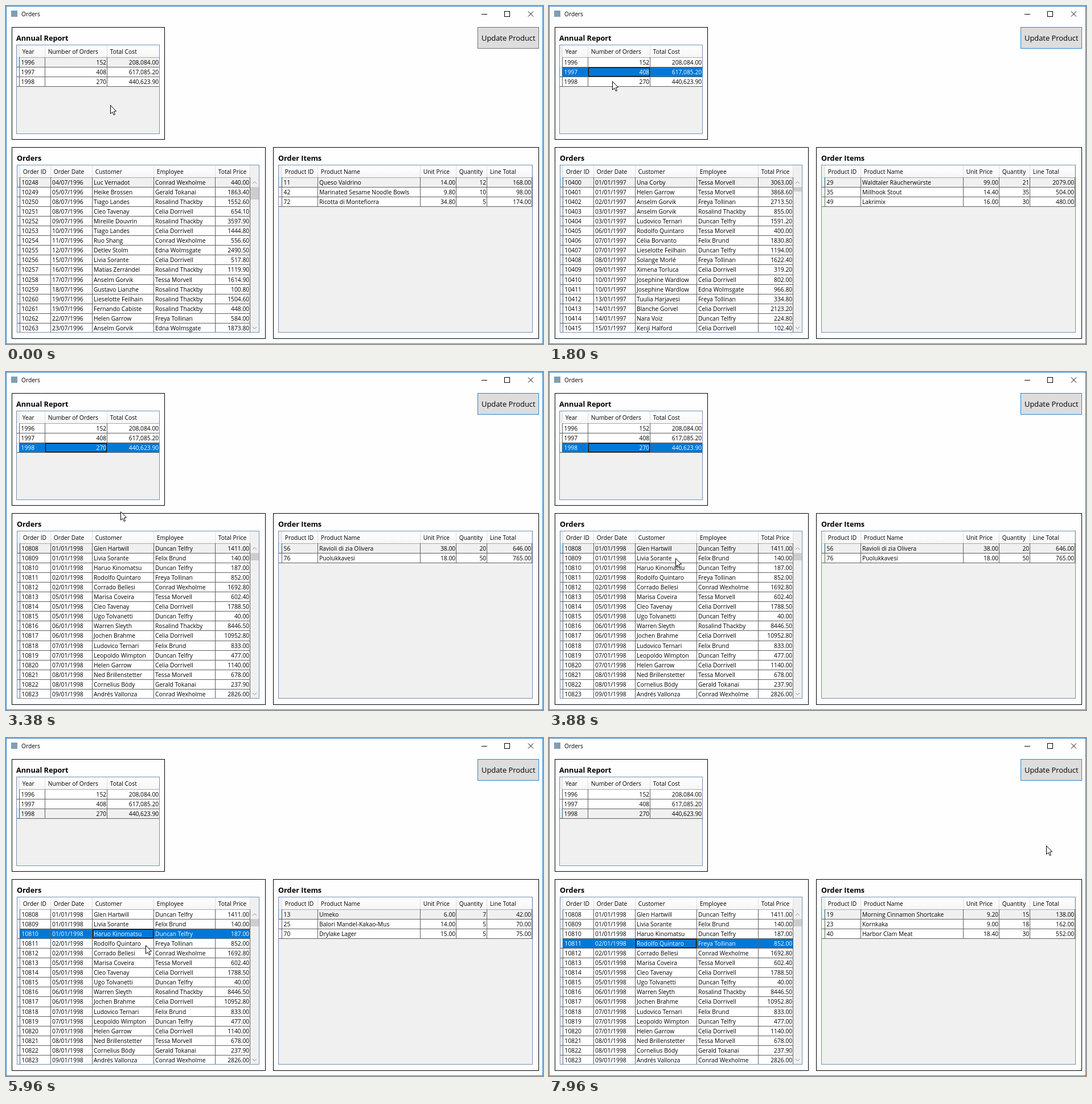
An HTML page with a canvas for the animation above (8000 ms loop, 943 by 594 pixels).

```html
<!DOCTYPE html>
<html lang="en">
<head>
<meta charset="utf-8">
<title>Orders</title>
<style>
html, body { margin: 0; width: 100%; height: 100%; overflow: hidden; background: #fefefe; }
canvas { display: block; width: 943px; height: 594px; }
</style>
</head>
<body>
<canvas id="stage" width="943" height="594"></canvas>
<script>
const ctx = document.getElementById('stage').getContext('2d');
const LOOP = 8000, ROW = 17.07;
const FONT = '"Open Sans", "Noto Sans", sans-serif';
const PAPER = '#fefefe', GREY = '#f0f0f0', LINE = '#606060', BLUE = '#0078d7';

const staff = ['Conrad Wexholme', 'Gerald Tokanai', 'Rosalind Thackby', 'Celia Dorrivell',
  'Edna Wolmsgate', 'Tessa Morvell', 'Freya Tollinan', 'Duncan Telfry', 'Felix Brund'];

const parse = (text, mark = ',') => text.trim().split('\n').map(s => s.split(mark));
// One order per line: day, customer, staff index, total
const orders = (first, month, text) => parse(text).map(([day, who, emp, sum], i) =>
  [String(first + i), day + '/' + month, who, staff[emp], sum]);
// One item per line: id, product, price, quantity, optional discount factor
const items = text => parse(text).map(([id, name, price, n, cut = 1]) =>
  [id, name, price, n, (price * n * cut).toFixed(2)]);

const years = parse(`1996;152;208,084.00
1997;408;617,085.20
1998;270;440,623.90`, ';');

const books = [
  { thumb: 22, rows: orders(10248, '07/1996', `04,Luc Vernadot,0,440.00
05,Heike Brossen,1,1863.40
08,Tiago Landes,2,1552.60
08,Cleo Tavenay,3,654.10
09,Mireille Douvrin,2,3597.90
10,Tiago Landes,3,1444.80
11,Ruo Shang,0,556.60
12,Detlev Stolm,4,2490.50
15,Livia Sorante,3,517.80
16,Matías Zerrándel,2,1119.90
17,Anselm Gorvik,5,1614.90
18,Gustavo Lianzhe,2,100.80
19,Lieselotte Feilhain,2,1504.60
19,Fernando Cabiste,2,448.00
22,Helen Garrow,6,584.00
23,Anselm Gorvik,4,1873.80`) },
  { thumb: 8, rows: orders(10400, '01/1997', `01,Una Corby,5,3063.00
01,Helen Garrow,5,3868.60
02,Anselm Gorvik,6,2713.50
03,Anselm Gorvik,2,855.00
03,Ludovico Ternari,7,1591.20
06,Rodolfo Quintaro,5,400.00
07,Célia Borvanto,8,1830.80
07,Lieselotte Feilhain,7,1194.00
08,Solange Morlé,6,1622.40
09,Ximena Torluca,3,319.20
10,Josephine Wardlow,3,802.00
10,Josephine Wardlow,4,966.80
13,Tuulia Harjavesi,6,334.80
14,Blanche Gorvel,3,2123.20
14,Nara Voiz,7,224.80
15,Kenji Halford,3,102.40`) },
  { thumb: 13, rows: orders(10808, '01/1998', `01,Glen Hartwill,7,1411.00
01,Livia Sorante,8,140.00
01,Haruo Kinomatsu,7,187.00
02,Rodolfo Quintaro,6,852.00
02,Corrado Bellesi,0,1692.80
05,Marisa Coveira,5,602.40
05,Cleo Tavenay,3,1788.50
05,Ugo Tolvanetti,7,40.00
06,Warren Sleyth,2,8446.50
06,Jochen Brahme,3,10952.80
07,Ludovico Ternari,8,833.00
07,Leopoldo Wimpton,7,477.00
07,Helen Garrow,3,1140.00
08,Ned Brillenstetter,5,678.00
08,Cornelius Bódy,1,237.90
09,Andrés Vallonza,0,2826.00`) }
];

const baskets = [`11,Queso Valdrino,14.00,12
42,Marinated Sesame Noodle Bowls,9.80,10
72,Ricotta di Montefiorra,34.80,5`,
`29,Waldtaler Räucherwürste,99.00,21
35,Millhook Stout,14.40,35
49,Lakrimix,16.00,30`,
`56,Ravioli di zia Olivera,38.00,20,0.85
76,Puolukkavesi,18.00,50,0.85`,
`52,Puff Duo,7.00,20`,
`13,Umeko,6.00,7
25,Balori Mandel-Kakao-Mus,14.00,5
70,Drylake Lager,15.00,5`,
`19,Morning Cinnamon Shortcake,9.20,15
23,Kornkaka,9.00,18
40,Harbor Clam Meat,18.40,30`].map(items);

// Clicks: when, selected year, selected order, focused table, basket
const clicks = [
  { at: 0, year: 0, order: 0, focus: '', basket: 0 },
  { at: 1150, year: 1, order: 0, focus: 'years', basket: 1 },
  { at: 2500, year: 2, order: 0, focus: 'years', basket: 2 },
  { at: 4260, year: 2, order: 1, focus: 'orders', basket: 3 },
  { at: 5230, year: 2, order: 2, focus: 'orders', basket: 4 },
  { at: 6260, year: 2, order: 3, focus: 'orders', basket: 5 }
];

const smooth = p => p * p * (3 - 2 * p);
const easeIn = p => Math.pow(p, 1.4);
const easeOut = p => 1 - Math.pow(1 - p, 1.6);

// Pointer moves: first step, last step, steps, from, to, easing, bend
const moves = [
  [30, 570, 15, [183, 174], [114, 114], smooth],
  [1610, 1800, 6, [114, 114], [111, 132], smooth],
  [3070, 3378, 9, [111, 132], [201, 245], easeIn],
  [3417, 3840, 12, [201, 245], [222, 326], easeOut, [283, 325]],
  [3880, 3881, 1, [222, 326], [222, 327], smooth],
  [4650, 4840, 6, [222, 327], [237, 342], smooth],
  [5530, 5960, 10, [237, 342], [245, 364], smooth],
  [7380, 7960, 16, [245, 364], [873, 189], smooth]
];

function pointerAt(t) {
  let pos = moves[0][3];
  for (const [t0, t1, n, a, b, ease, bend] of moves) {
    if (t < t0) break;
    const k = Math.floor((t - t0) / (t1 - t0) * (n - 1) + 0.01) + 1;
    const p = ease(Math.min(1, k / n)), q = 1 - p;
    pos = a.map((v, i) => bend
      ? q * q * v + 2 * p * q * bend[i] + p * p * b[i]
      : v + (b[i] - v) * p);
  }
  return pos.map(Math.round);
}

function box(x, y, w, h, color) {
  ctx.fillStyle = color;
  ctx.fillRect(x, y, w, h);
}

function frame(x0, y0, x1, y1, color) {
  ctx.strokeStyle = color;
  ctx.lineWidth = 1;
  ctx.strokeRect(x0 + 0.5, y0 + 0.5, x1 - x0, y1 - y0);
}

function path(points, color) {
  ctx.beginPath();
  points.forEach(([x, y]) => ctx.lineTo(x, y));
  ctx.strokeStyle = color;
  ctx.lineWidth = 1;
  ctx.stroke();
}

function label(s, x, y, size = 10.3, { color = '#000', bold = false, right = false } = {}) {
  ctx.font = (bold ? 'bold ' : '') + size + 'px ' + FONT;
  ctx.textAlign = right ? 'right' : 'left';
  ctx.fillStyle = color;
  ctx.fillText(s, x, y);
}

const tables = {
  years: {
    title: 'Annual Report', panel: [10, 37, 278, 234], grid: [18, 68, 269, 224],
    top: 90, edges: [23, 68, 177, 269], heads: ['Year', 'Number of Orders', 'Total Cost'],
    numeric: 1, focusCol: 1, titleAt: [18, 60.5]
  },
  orders: {
    title: 'Orders', panel: [10, 248, 455, 584], grid: [19, 279, 444, 573],
    top: 301.3, edges: [24, 78, 151, 259, 367, 428],
    heads: ['Order ID', 'Order Date', 'Customer', 'Employee', 'Total Price'],
    numeric: 4, focusCol: 2, titleAt: [19, 272]
  },
  items: {
    title: 'Order Items', panel: [469, 248, 935, 584], grid: [478, 279, 924, 573],
    top: 301.3, edges: [484, 547, 727, 790, 844, 923],
    heads: ['Product ID', 'Product Name', 'Unit Price', 'Quantity', 'Line Total'],
    numeric: 2, focusCol: 0, titleAt: [478, 272]
  }
};

function drawTable(tb, rows, current, focused) {
  const [gx, gy, gr, gb] = tb.grid, e = tb.edges;
  const left = e[0], right = e[e.length - 1], top = Math.floor(tb.top);
  const lineY = i => Math.floor(tb.top + ROW * i);

  frame(...tb.panel, '#000');
  label(tb.title, ...tb.titleAt, 12.7, { bold: true });
  box(gx, gy, gr - gx, gb - gy, GREY);

  ctx.save();
  ctx.beginPath();
  ctx.rect(gx, gy, gr - gx + 1, gb - gy);
  ctx.clip();

  const shade = ctx.createLinearGradient(0, gy, 0, top);
  shade.addColorStop(0, '#ffffff');
  shade.addColorStop(1, '#f6f6f6');
  box(left, gy + 1, right - left, top - gy - 1, shade);
  e.forEach(x => box(x, gy + 1, 1, top - gy - 1, '#dedede'));
  tb.heads.forEach((s, i) => label(s, e[i] + 5.7, top - 6.3));

  // Row backgrounds first, so that the grid lines stay on top
  rows.forEach((row, r) => {
    const y = lineY(r), h = lineY(r + 1) - y, on = r === current;
    box(gx + 1, y, left - gx - 1, h, '#fafafa');
    box(left, y, right - left, h, on ? (focused ? BLUE : GREY) : '#fff');
  });
  box(left, top, right - left, 1, '#a8a8a8');
  rows.forEach((row, r) => box(gx + 1, lineY(r + 1), right - gx, 1, LINE));
  e.forEach(x => box(x, top, 1, lineY(rows.length) - top + 1, LINE));
  frame(gx + 1, lineY(current), left - 1, lineY(current + 1) - 1, '#b9e3f7');

  rows.forEach((row, r) => row.forEach((s, c) => {
    const right = c >= tb.numeric;
    const x = right ? e[c + 1] - 0.8 : e[c] + (c ? 3 : 3.5);
    const color = r === current && focused ? '#fff' : '#000';
    label(s, x, tb.top + ROW * r + 12.5, 10.3, { right, color });
  }));

  if (focused) {
    const c = tb.focusCol;
    frame(e[c] + 1, lineY(current) + 1, e[c + 1] - 1, lineY(current + 1) - 1, '#000');
  }
  ctx.restore();
  frame(gx, gy, gr, gb, '#7391b5');
}

function drawScroll(thumb) {
  box(429, 302, 15, 271, GREY);
  box(429, 318, 15, thumb, '#cdcdcd');
  path([[433, 312], [436.5, 308.5], [440, 312]], '#8c8c8c');
  path([[433, 564], [436.5, 567.5], [440, 564]], '#8c8c8c');
}

function drawWindow(active) {
  box(0, 0, 943, 594, PAPER);
  frame(0, 0, 942, 593, '#2b88d4');
  box(9, 8, 11, 11, '#7f9fb3');
  label('Orders', 27, 18, 10.2);
  box(835, 14, 10, 1, '#000');
  frame(875, 9, 884, 18, '#000');
  path([[917, 9.5], [926, 18.5]], '#000');
  path([[926, 9.5], [917, 18.5]], '#000');
  box(828, 37, 108, 38, '#dddddd');
  frame(828, 37, 935, 74, active ? '#2a86d2' : '#707070');
  label('Update Product', 835, 61, 12.9);
}

function drawPointer([x, y]) {
  const tip = [[0, 0], [0, 14.8], [3.4, 11.8], [5.8, 17], [8, 16.2], [5.8, 10.8], [10, 10.4]];
  ctx.beginPath();
  tip.forEach(([dx, dy]) => ctx.lineTo(x + dx + 0.5, y + dy + 0.5));
  ctx.closePath();
  ctx.fillStyle = '#fff';
  ctx.fill();
  ctx.strokeStyle = '#000';
  ctx.lineWidth = 1;
  ctx.stroke();
}

function draw(t) {
  const state = clicks.filter(c => c.at <= t).pop();
  const book = books[state.year];
  drawWindow(state.focus !== '');
  drawTable(tables.years, years, state.year, state.focus === 'years');
  drawTable(tables.orders, book.rows, state.order, state.focus === 'orders');
  drawScroll(book.thumb);
  drawTable(tables.items, baskets[state.basket], 0, false);
  drawPointer(pointerAt(t));
}

const start = performance.now();
function tick() {
  draw((performance.now() - start) % LOOP);
  requestAnimationFrame(tick);
}
tick();
</script>
</body>
</html>
```
